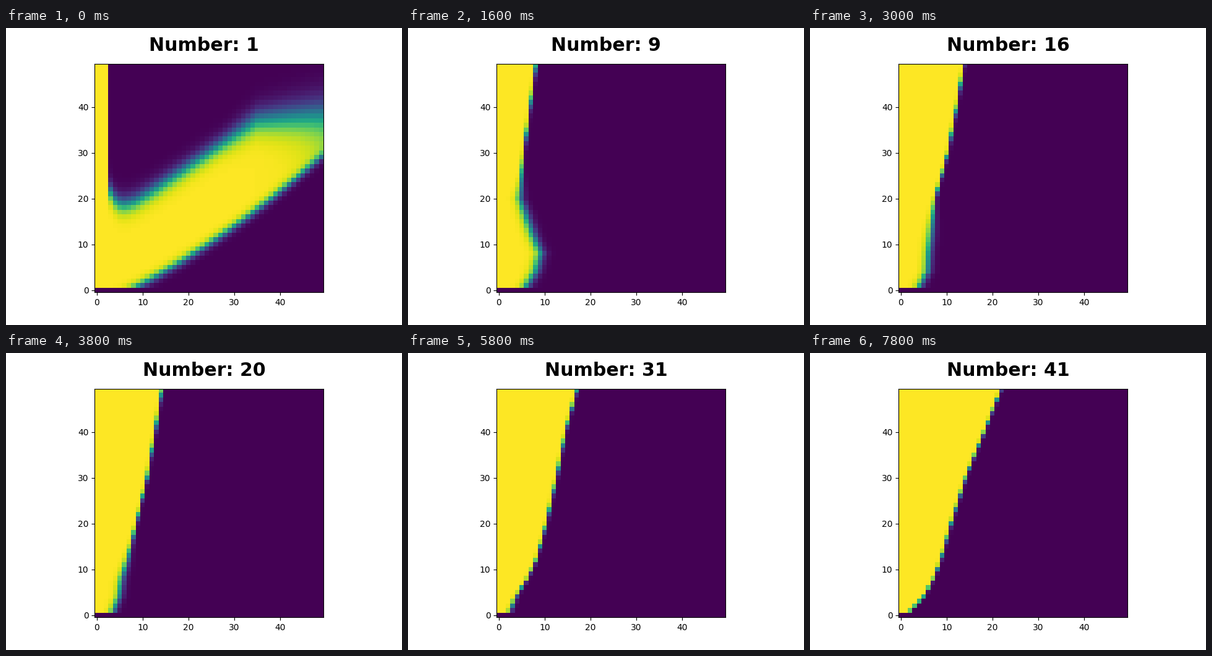
Animation, 640 px wide and 480 px high, one loop 8 s. Source, as a matplotlib script:

```python
import numpy as np
import matplotlib.pyplot as plt
from matplotlib.animation import FuncAnimation

SIZE, FRAMES, INTERVAL = 50, 40, 200
x = np.arange(SIZE)
y = x[:, None]

# Early phase, a strip on the left and a lobe that shrinks into it:
# strip column, strip lean, roof drop, roof height, roof slope,
# floor foot, floor slope, floor softness
EARLY = {
    1: (2.5, 0, 6, 13.3, 0.68, 9.3, 0.53, 0.55),
    5: (1.6, 0.06, 9.4, 11, 0.38, 7.3, 1.15, 0.9),
    9: (1.43, 0.135, 15, 15.1, -0.6, 6, 2.05, 1.2),
}

# Late phase, one edge: its column at a few heights
HEIGHTS = [1, 4, 8, 12, 20, 30, 40, 50]
LATE = {
    9: (6.1, 8, 9.1, 7.4, 4.6, 5.45, 6.85, 8.2),
    16: (4.2, 5.8, 6.1, 6.6, 7.5, 10.3, 12.2, 13.9),
    24: (3.05, 3.9, 4.87, 6.85, 9.7, 11.7, 13.25, 14.75),
    31: (2.5, 3.77, 6.3, 8.15, 10.4, 12.6, 14.55, 17.3),
    41: (2.15, 5.05, 7.2, 8.7, 11, 14.15, 18.2, 22.2),
}


def sig(z):
    return 1 / (1 + np.exp(-np.clip(z, -60, 60)))


def tween(n, keys, pace=lambda k: k):
    """Blend the keyed rows at n; pace bends the time axis."""
    at = [pace(k) for k in keys]
    return [np.interp(pace(n), at, column) for column in zip(*keys.values())]


def early(n):
    start, lean, drop, height, rise, foot, slope, soft = tween(
        n, EARLY, lambda k: -1 / k)
    strip = sig((start + lean * y - x) / 0.085)
    roof = drop * np.exp((3 - x) / 2) + height + rise * x
    roof = np.minimum(roof, 33.5 + 0.1 * x)
    roof_soft = 1.1 + 0.05 * np.maximum(x - 27, 0)
    run = x - foot
    floor = 1 + slope * run + 0.0045 * run * np.abs(run)
    tip = 58 / n ** 0.72
    lobe = (sig((roof - y) / roof_soft) * sig((y - floor) / soft)
            * sig(14 * (1 - x / tip)))
    return 1 - (1 - lobe) * (1 - strip)


def late(n):
    edge = np.interp(y, HEIGHTS, tween(n, LATE))
    # The blur sits near the bottom and sinks away as n grows.
    soft = 0.13 + (0.6 - 0.014 * n) * sig((30 - 0.85 * n - y) / 2)
    return sig((edge - x) / soft)


def field(n):
    z = early(n) if n < 9 else late(n)
    z[0] = 0
    return z


def number(i):
    # The count jumps over 28.
    return i + 1 + (i > 26)


fig, ax = plt.subplots(figsize=(6.4, 4.8), dpi=100)
image = ax.imshow(field(1), origin="lower", cmap="viridis", vmin=0, vmax=1,
                  interpolation="nearest")
title = fig.suptitle("Number: 1", y=0.97, fontsize=21.6, fontweight="bold")


def draw(i):
    n = number(i)
    image.set_data(field(n))
    title.set_text(f"Number: {n}")
    return image, title


anim = FuncAnimation(fig, draw, frames=FRAMES, interval=INTERVAL,
                     repeat=True, repeat_delay=0)
plt.show()
```
